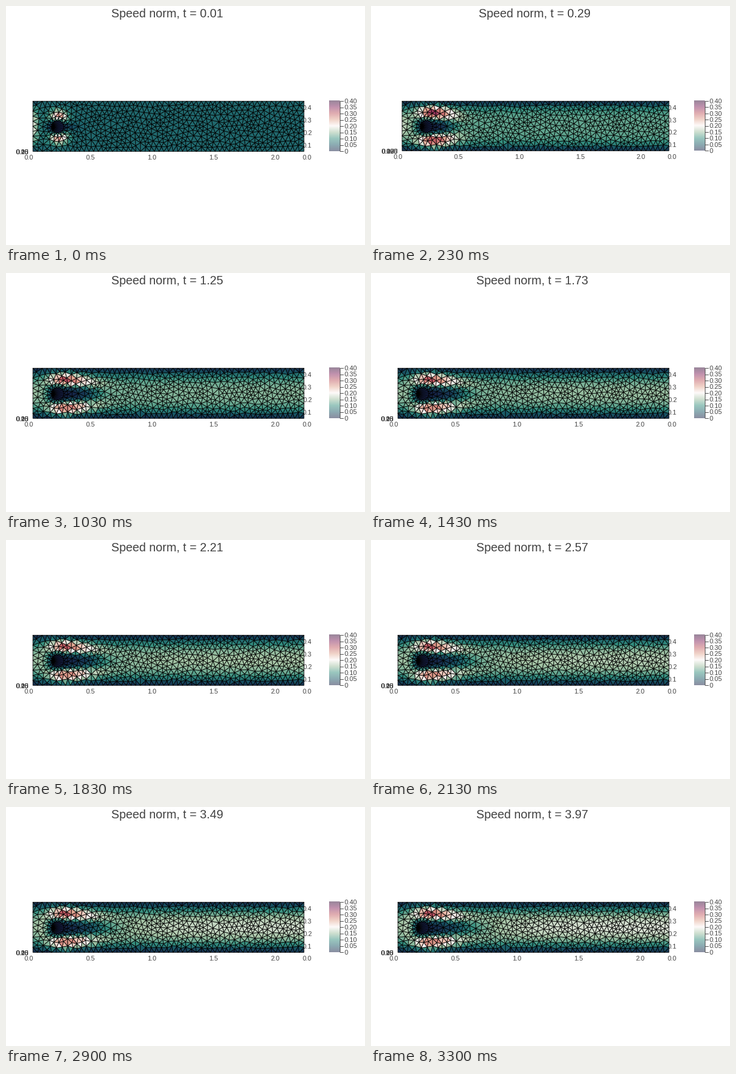
Animation, 600 px wide and 400 px high, one loop 3.33 s. Source, as a matplotlib script:

```python
import numpy as np
import matplotlib.pyplot as plt
from matplotlib.animation import FuncAnimation
from matplotlib.collections import LineCollection, PolyCollection
from matplotlib.colors import LinearSegmentedColormap
from matplotlib.transforms import Affine2D
from matplotlib.tri import Triangulation

TICK_MS, LOOP_MS = 10, 3330
LENGTH, HEIGHT = 2.2, 0.41
CENTER, RADIUS = 0.2 + 0.2j, 0.05
RIGHT, TOP = 498, 159.3
INK = "#404040"
PX = 0.72  # points per pixel at 100 dpi

plt.rcParams["font.family"] = "Liberation Sans"

CURL = LinearSegmentedColormap.from_list("curl", [
    "#141d43", "#185866", "#348f7f", "#a2c2a3", "#fdf5f4",
    "#e2a792", "#c15962", "#83235d", "#340d35"])


def circle(radius, count, turn=0.5):
    return CENTER + radius * np.exp(2j * np.pi * (np.arange(count) / count + turn))


def build_mesh(n_circle=18, spacing=0.0305):
    """Graded random mesh; the cylinder itself is closed by a fan."""
    rng = np.random.default_rng(4)
    xs = np.linspace(0, LENGTH, 59)
    ys = np.linspace(0, HEIGHT, 11)[1:-1]
    pts = np.concatenate([
        circle(RADIUS, n_circle), circle(0.083, 17, 0.52), circle(0.12, 19),
        xs, xs + 1j * HEIGHT, 1j * ys, LENGTH + 1j * ys])
    fixed = len(pts)
    for x, y in rng.random((8000, 2)):
        p = complex(x * LENGTH, 0.022 + y * (HEIGHT - 0.044))
        if abs(p - CENTER) > 0.135 and np.abs(pts - p).min() > spacing:
            pts = np.append(pts, p)
    for _ in range(3):
        a, b = Triangulation(pts.real, pts.imag).edges.T
        total, count = np.zeros(len(pts), complex), np.zeros(len(pts))
        for i, j in ((a, b), (b, a)):
            np.add.at(total, i, pts[j])
            np.add.at(count, i, 1)
        pts[fixed:] = (total / np.maximum(count, 1))[fixed:]
    tris = Triangulation(pts.real, pts.imag).triangles
    tris = tris[(tris >= n_circle).any(axis=1)]
    fan = [(0, k, k + 1) for k in range(1, n_circle - 1)]
    return pts, np.vstack([tris, fan])


points, triangles = build_mesh()
X, Y = points.real, points.imag
V = Y - CENTER.imag
S = np.abs(2 * Y / HEIGHT - 1)
R = np.abs(points - CENTER)


def sigmoid(z):
    return 1 / (1 + np.exp(-np.clip(z, -50, 50)))


def speed(t):
    start = np.exp(-t / 0.07)  # initial transient
    settle = np.exp(-t)

    # Channel flow: a flat plug relaxing to a parabola
    wall = 1 - np.exp(-(t / 0.03) ** 2)
    u = 0.117 + 0.017 * t - 0.06 * start
    u = u * (1 - wall * S ** (1.1 + 1.8 / np.sqrt(t)))
    near = np.exp(-(V / 0.1) ** 2 - np.maximum(X - 0.5, 0) / 0.4)
    u *= 1 - 0.08 * t * near * (X > 0.3)

    mix = np.exp(-X / (0.085 - 0.07 * start))
    inlet = 0.145 + 0.05 * np.exp(-2 * t) + 0.03 * start
    u = u * (1 - mix) + inlet * (1 - S ** 2) * mix

    # Fast lanes above and below the cylinder
    along = X - (0.25 - 0.05 * start)
    width = np.where(along < 0, 0.11 - 0.06 * start,
                     0.27 - 0.12 * settle - 0.1 * start)
    lane = 0.12 - 0.045 * start - 0.15 * np.clip(X - 0.27, 0, 0.3)
    lobe = 0.225 + 0.05 * settle
    u += (lobe * np.exp(-(along / width) ** 2)
          * np.exp(-((np.abs(V) - lane) / 0.047) ** 2) * (1 - S ** 8))

    # Slow wake behind the cylinder
    end = 0.56 - 0.2 * settle - 0.03 * start
    wake = sigmoid((X - 0.13) / 0.015) * sigmoid((end - X) / (0.03 + 0.015 * t))
    half = 0.075 - 0.02 * settle - 0.035 * start
    u *= 1 - 0.97 * wake * np.exp(-(V / half) ** 4)
    u *= 1 - np.exp(-np.maximum(R - RADIUS, 0) / 0.012)
    return u[triangles].mean(axis=1)


fig = plt.figure(figsize=(6, 4), dpi=100, facecolor="white")
ax = fig.add_axes([0, 0, 1, 1])


def label(x, text="", size=11, ha="center"):
    return ax.text(x, 0, text, fontsize=size * PX, color=INK, ha=ha,
                   va="baseline", zorder=1)


title = label(0, size=20, ha="left")
title.set_y(19)
x_labels = [label(0, f"{0.5 * k:.1f}") for k in range(5)]
y_labels = [label(503.7, f"{0.1 * k:.1f}") for k in range(5)]
z_labels = [label(0, ha="right") for _ in range(5)]
bar_labels = [label(566, f"{0.05 * k:.2f}" if k else "0", ha="left")
              for k in range(9)]
bar = ax.imshow(np.linspace(1, 0, 168)[:, None], cmap=CURL, alpha=0.5,
                aspect="auto", extent=(540, 558, 243, 159))
bar_ticks = ax.add_collection(LineCollection([], colors=INK, linewidths=0.9 * PX))
ax.set(xlim=(0, 600), ylim=(400, 0))
ax.axis("off")

place = Affine2D()
mesh = ax.add_collection(PolyCollection(
    np.stack([X, Y], axis=-1)[triangles], cmap=CURL, edgecolors="black",
    linewidths=0.85 * PX, zorder=3, transform=place + ax.transData),
    autolim=False)
mesh.set_clim(0, 0.4)


def set_layout(wide):
    """Longer z labels push the plot to the right."""
    left, bottom = (52, 242.3) if wide else (45, 243.3)
    sx, sy = (RIGHT - left) / LENGTH, (bottom - TOP) / HEIGHT
    place.clear().scale(sx, -sy).translate(left, bottom)
    title.set_x(left / 2 + 154)
    for k, text in enumerate(x_labels):
        text.set_position((left - 6.7 + 0.5 * k * sx, bottom + 14))
    for k, text in enumerate(y_labels):
        text.set_y(bottom + 14 - 0.1 * k * (sy + 2.4))
    for k, text in enumerate(z_labels):
        text.set_text(f"{0.075 * k:.3f}" if wide else f"{0.05 * (k + 1):.2f}")
        text.set_position((left - 7, bottom + 4.7))
    bar.set_extent((540, 558, bottom, 159))
    heights = np.linspace(bottom, 159, 9)
    for y, text in zip(heights, bar_labels):
        text.set_y(y + 3.7)
    bar_ticks.set_segments([[(558, y), (564, y)] for y in heights]
                           + [[(558, 159), (558, bottom)]])


def update(tick):
    step = (3 * tick + 1) // 10  # 30 steps a second, on a 10 ms clock
    t = 0.01 + 0.04 * step
    set_layout(0.03 < t < 0.75)
    title.set_text(f"Speed norm, t = {t:.2f}")
    mesh.set_array(speed(t))
    return []


anim = FuncAnimation(fig, update, frames=LOOP_MS // TICK_MS, interval=TICK_MS,
                     init_func=lambda: update(0), repeat=True, repeat_delay=0)
plt.show()
```
